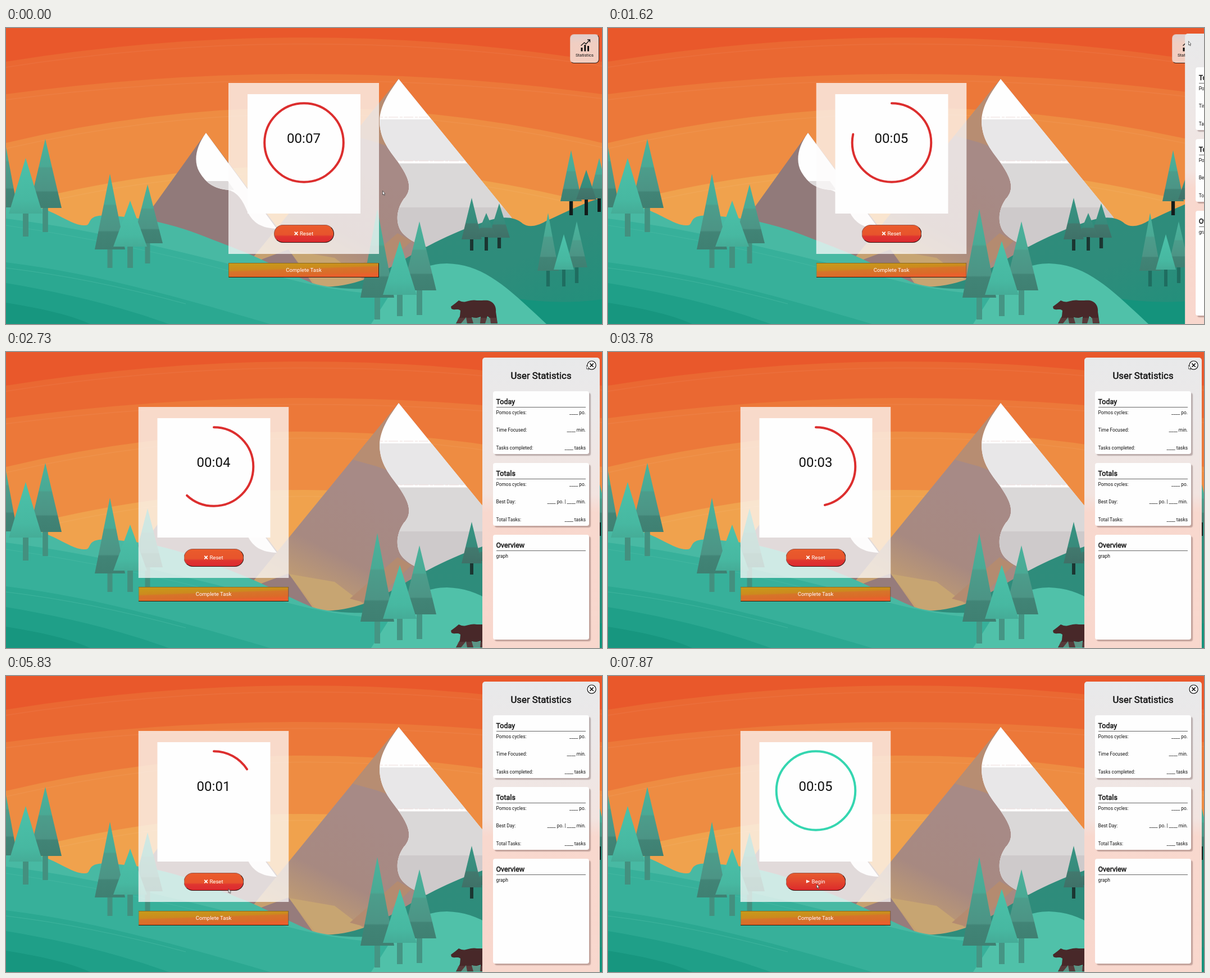
Animation, 1061 px wide and 528 px high, one loop 8000 ms. Source, as an HTML page:

```html
<!DOCTYPE html>
<html lang="en">
<head>
<meta charset="utf-8">
<title>Focus timer</title>
<style>
html, body { margin: 0; width: 100%; height: 100%; overflow: hidden; }
body { font-family: Roboto, "Open Sans", sans-serif; color: #111; }
#stage { position: relative; width: 1061px; height: 528px; overflow: hidden; background: #e9582b; }
#stage > *, .abs { position: absolute; }
#scene { left: 0; top: 0; }

.stats { left: 1004px; top: 11px; width: 50px; height: 50px; border-radius: 7px;
  background: linear-gradient(#dfcfcd, #f0cec2 30%, #f3cdbf); border: 1px solid; border-color: #e3b5a6 #33211c #33211c #e3b5a6; }
.stats svg { left: 0; top: 0; }
.stats span { left: 0; width: 100%; top: 32px; font-size: 7.7px; line-height: 10px; text-align: center; }

#timer { left: 396px; top: 98px; width: 268px; height: 348px; animation: shift 8s infinite; }
.box { left: 0; top: 0; width: 100%; height: 304.5px; background: rgba(252,251,251,.75); }
.face { left: 33.5px; top: 20px; width: 201px; height: 213px; background: #fefefe; }
.face svg { left: 0; top: 0; }
#clock { left: 0; width: 100%; top: 64px; font-size: 24px; line-height: 30px; text-align: center; }
#ring { fill: none; stroke-width: 4; stroke-linecap: round; stroke-dasharray: 1 2;
  animation: drain 8s linear infinite, tint 8s linear infinite; }
.btn { box-sizing: border-box; color: #fff; font-size: 9.6px; text-align: center; border: 1px solid; }
#action { left: 80.5px; top: 252.5px; width: 107.5px; height: 32px; border-radius: 16px; line-height: 30px;
  border-width: 1px 1.5px 1.5px 1px; border-color: #9a5548 #2a1512 #2a1512 #9a5548;
  background: linear-gradient(#ea5b2c, #e7542c 56%, #df3530 66%, #dc2a30); }
#action svg { vertical-align: -.5px; margin-right: 2.5px; }
#action.ready { background: linear-gradient(#e65a2e, #e2452d 50%, #dc2a2c); }
.task { left: 0; top: 321px; width: 268px; height: 26px; line-height: 24px;
  border-color: #8f6a20 #2d1a0c #2d1a0c #8f6a20; border-radius: 1px;
  background: linear-gradient(178deg, #c8991a 5%, #cc8a1e 38%, #d6742a 46%, #db6b29 72%, #e9602c 84%); }

#panel { left: 848px; top: 10px; width: 209px; height: 530px; border-radius: 5px 5px 0 0;
  background: linear-gradient(#e8e9ea, #ece8e8 20%, #f2e4e0 46%, #f8d8ce 52%, #f8d7cd); animation: slide 8s infinite; }
#panel h1, #panel h2 { margin: 0; font-weight: 400; -webkit-text-stroke: .45px #111; }
#panel h1 { position: absolute; left: 0; right: 0; top: 22px; font-size: 16.8px; line-height: 20px; text-align: center; }
.card { position: absolute; left: 18.5px; width: 171.5px; background: #fefefe; border-radius: 4px; box-shadow: 3px 3px 1.5px rgba(70,40,40,.3); }
.card h2 { position: absolute; left: 6px; right: 6px; top: 10px; height: 17.5px; font-size: 12.5px; line-height: 17px; border-bottom: 1px solid #666; }
.row { position: absolute; left: 6px; right: 6px; font-size: 8.4px; line-height: 10px; display: flex; justify-content: space-between; white-space: pre; }
.close { left: 186px; top: 5px; }
#cursor { left: 0; top: 0; animation: point 8s linear infinite; }

@keyframes shift { 0%, 19.1% { transform: none; animation-timing-function: ease; } 27.6%, 100% { transform: translateX(-160.5px); } }
@keyframes slide { 0%, 19.1% { transform: translateX(213px); animation-timing-function: ease; } 27.6%, 100% { transform: none; } }
@keyframes drain { 0%, 2.1% { stroke-dashoffset: 0; } 86.25% { stroke-dashoffset: 1; } 86.26%, 100% { stroke-dashoffset: 0; } }
@keyframes tint { 0%, 95% { stroke: #dc2e2e; } 98.2%, 100% { stroke: #35d6b0; } }
@keyframes point {
  0%, 1.9% { transform: translate(670px, 290px); }
  11.5%, 53% { transform: translate(1033px, 23px); }
  54.4% { transform: translate(1012px, 32px); }
  60.75% { transform: translate(804px, 72px); }
  68% { transform: translate(520px, 394px); }
  69.5% { transform: translate(470px, 404px); }
  74%, 100% { transform: translate(371px, 371px); }
}
</style>
</head>
<body>
<div id="stage">
  <svg id="scene" width="1061" height="528">
    <defs>
      <linearGradient id="pine" x2="0" y2="1">
        <stop offset="0" stop-color="#49b39d"/><stop offset=".4" stop-color="#4aa994"/>
        <stop offset=".42" stop-color="#4c9d8b"/><stop offset=".75" stop-color="#4c9485"/>
        <stop offset=".77" stop-color="#418476"/><stop offset="1" stop-color="#3f8072"/>
      </linearGradient>
      <linearGradient id="bright" x2="0" y2="1">
        <stop offset="0" stop-color="#4bc2aa"/><stop offset=".75" stop-color="#47b8a1"/><stop offset="1" stop-color="#45ac97"/>
      </linearGradient>
      <linearGradient id="dark" x2="0" y2="1">
        <stop offset="0" stop-color="#379684"/><stop offset=".6" stop-color="#388a7b"/>
        <stop offset=".63" stop-color="#42796e"/><stop offset="1" stop-color="#3f7168"/>
      </linearGradient>
      <linearGradient id="rock" gradientUnits="userSpaceOnUse" x1="690" y1="280" x2="590" y2="470">
        <stop offset="0" stop-color="#a78a86"/><stop offset=".55" stop-color="#a78981"/><stop offset="1" stop-color="#c6a06f"/>
      </linearGradient>
      <linearGradient id="ridge" x2="1" y2="1">
        <stop offset="0" stop-color="#2f8c7b"/><stop offset=".6" stop-color="#2e8c7b"/><stop offset="1" stop-color="#1f907b"/>
      </linearGradient>
      <clipPath id="cap"><path d="M699 91C682 115 666 138 665 165C665 205 690 225 705 250C722 277 720 292 708 305C692 328 694 355 708 368C720 380 735 386 748 390L900 390V338Z"/></clipPath>
      <clipPath id="meadow"><path d="M0 310C45 310 75 325 100 338S132 352 141 352C152 352 144 338 165 335C180 333 200 336 230 339C262 343 290 350 318 359C350 370 390 386 430 402C470 419 510 441 545 455C580 466 640 468 690 462L962 528H0Z"/></clipPath>
    </defs>
    <g id="sky"></g>

    <path d="M356 187L220 377L300 430L600 490L565 465Z" fill="#917a7a"/>
    <path d="M356 187C336 215 334 240 345 258C356 276 370 287 396 289C415 294 423 312 430 328C440 348 455 357 482 358Z" fill="#fefefe"/>
    <path d="M357 273H395L406 289C385 289 368 285 357 273Z" fill="#dcd8d8"/>

    <path d="M699 91L400 458L600 480L780 400L900 338Z" fill="url(#rock)"/>
    <path d="M699 91L617 192L660 204L690 215L672 130Z" fill="#b78d72"/>
    <path d="M503 396L560 468L640 452L585 410Z" fill="#c7a572"/>
    <path d="M430 422L503 395L553 466L440 470Z" fill="#967c7c"/>
    <path d="M697 366L722 380L650 450L612 440Z" fill="#b48b70"/>
    <g clip-path="url(#cap)">
      <path d="M600 80H910V400H600Z" fill="#fefefe"/>
      <path d="M600 163H910V237H600Z" fill="#e8e7e8"/>
      <path d="M600 241.500H910V320H600Z" fill="#dad8d8"/>
      <path d="M600 320H910V400H600Z" fill="#cecacb"/>
      <path d="M600 159H910M600 237H910" stroke="#eddcda" stroke-dasharray="17 3 5 2"/>
    </g>

    <path d="M1061 303C1035 309 1000 327 960 345C945 354 930 356 920 349C905 336 885 336 860 343C800 362 750 388 705 415C660 442 620 462 560 462L700 528H1061Z" fill="url(#ridge)"/>
    <path d="M905 482C960 490 1010 491 1061 484V528H950Z" fill="#14937c"/>

    <g clip-path="url(#meadow)">
      <path d="M0 300H1061V528H0Z" fill="#48b9a3"/>
      <path d="M0 340C180 362 360 412 520 452S800 474 1061 480V528H0Z" fill="#37b09a"/>
      <path d="M0 418C150 436 300 478 470 528H0Z" fill="#2ba891"/>
      <path d="M0 455C90 470 190 492 290 528H0Z" fill="#1f9f88"/>
      <path d="M0 490C60 500 110 510 150 528H0Z" fill="#17967f"/>
      <path d="M0 352Q220 385 400 434M0 428Q150 446 320 492" fill="none" stroke="#4cbba6" stroke-opacity=".6"/>
    </g>
    <path d="M690 465C720 432 755 420 785 420C850 422 890 460 962 528H650Z" fill="#50c1a9"/>
    <g id="trees"></g>
    <path d="M792 497L800 491L806 486L811 488C819 490 824 485 834 485.500C844 487 850 485 858 486C868 488 873 497 872 506L875 527H863L862 518L857 514L853 527H844L845 515C838 518 834 517 829 516L832 527H821L819 516L810 527H801L808 514L809 504C804 500 799 504 793 501Z" fill="#482829"/>
    <path d="M805 517H873L875 527H802Z" fill="#6b5450" opacity=".4"/>
  </svg>

  <div class="stats">
    <svg class="abs" width="50" height="50" fill="none" stroke="#111">
      <path d="M20 23V29.500M25.800 18V29.500M31.500 20V29.500" stroke-width="3"/>
      <path d="M18.500 19.500L24.500 14L27.500 16.500L34 9.500M30 9H34.500V13.500" stroke-width="1.300"/>
    </svg>
    <span class="abs">Statistics</span>
  </div>

  <div id="timer">
    <div class="abs box"></div>
    <div class="abs face">
      <svg class="abs" width="201" height="213">
        <circle id="ring" cx="100.500" cy="86.500" r="70.300" pathLength="1" transform="rotate(-90 100.500 86.500)"/>
      </svg>
      <div id="clock" class="abs">00:07</div>
    </div>
    <div id="action" class="abs btn"><svg width="7" height="7"><path id="icon" stroke="#fff"/></svg><span id="label">Reset</span></div>
    <div class="abs btn task">Complete Task</div>
  </div>

  <div id="panel">
    <h1>User Statistics</h1>
    <svg class="abs close" width="18" height="18" stroke="#111">
      <circle cx="8.600" cy="8.600" r="7.600" fill="#fff" stroke-width="1.200"/>
      <path d="M5.400 5.400L11.800 11.800M11.800 5.400L5.400 11.800" stroke-width="1.600"/>
    </svg>
  </div>

  <svg id="cursor" width="8" height="12"><path d="M.5 .5V7.500L2 6.200L3.200 8.800L4.300 8.300L3.200 5.800H5Z" fill="#fff" stroke="#333" stroke-width=".7"/></svg>
</div>
<script>
const $ = id => document.getElementById(id);

// Sky bands: height at the sides, height in the middle, colour
$('sky').innerHTML = [
  [60, 17, '#ea6832'], [118, 82, '#ec7839'], [205, 142, '#ee8c42'], [318, 246, '#f0a24d']
].map(([side, mid, color]) =>
  `<path d="M0 ${side}Q530 ${2 * mid - side} 1061 ${side}V528H0Z" fill="${color}"/>
   <path d="M0 ${side + 10}Q530 ${2 * mid - side + 14} 1061 ${side + 8}" fill="none" stroke="#fff" stroke-opacity=".04" stroke-width="2"/>`
).join('');

function tree(x, top, base, half, foot, fill, trunk) {
  const w = half / 3;
  return `<path d="M${x - w / 2} ${base - 3}h${w}V${foot}h${-w}Z" fill="${trunk}"/>
    <path d="M${x} ${top}L${x + half} ${base}H${x - half}Z" fill="url(#${fill})"/>`;
}
const groups = [
  ['#43907f', [-6, 180, 320, 26, 345], [70, 198, 321, 29, 364], [35, 232, 331, 30, 372]],
  ['#43907f', [185, 260, 395, 27, 428], [252, 279, 384, 27, 420], [221, 308, 390, 30, 428]],
  ['#459584', [661, 323, 481, 30, 520], [736, 345, 468, 30, 512], [701, 380, 476, 30, 514]],
  ['#1b3632', [829, 303, 377, 18, 397], [878, 313, 374, 19, 393], [855, 330, 373, 18, 397]],
  ['#121c1b', [1006, 218, 309, 19, 334], [1056, 232, 304, 18, 328], [1033, 253, 306, 18, 334]],
  ['#1f6d60', [965, 330, 433, 19, 461], [1016, 345, 427, 19, 455], [993, 368, 431, 18, 461]]
];
$('trees').innerHTML = groups.map(([trunk, ...list], g) => list.map((spec, i) => {
  const fill = g === 3 || (g === 4 && i === 2) ? 'dark' : i === 2 ? 'bright' : 'pine';
  return tree(...spec, fill, trunk);
}).join('')).join('');

const cards = [
  ['Today', 60, 112, ['Pomos cycles:', '____ po.'], ['Time Focused:', '____ min.'], ['Tasks completed:', '____ tasks']],
  ['Totals', 188, 112, ['Pomos cycles:', '____ po.'], ['Best Day:', '____ po. | ____ min.'], ['Total Tasks:', '____ tasks']],
  ['Overview', 316, 187, ['graph', '']]
];
$('panel').insertAdjacentHTML('beforeend', cards.map(([title, top, height, ...rows]) =>
  `<div class="card" style="top:${top}px;height:${height}px"><h2>${title}</h2>` +
  rows.map(([name, value], i) =>
    `<div class="row" style="top:${32.5 + i * 31.7}px"><span>${name}</span><span>${value}</span></div>`).join('') +
  '</div>').join(''));

const LOOP = 8000, BEGIN = 170, END = 6900, WORK = 7, REST = 5;
let start;
function tick(now) {
  start ??= now;
  const t = (now - start) % LOOP;
  const done = t >= END;
  const left = WORK * Math.min(1, (END - t) / (END - BEGIN));
  $('clock').textContent = '00:0' + (done ? REST : Math.floor(left));
  $('label').textContent = done ? 'Begin' : 'Reset';
  $('action').className = 'abs btn' + (done ? ' ready' : '');
  $('icon').setAttribute('d', done ? 'M.5 .8L6.500 3.500L.5 6.200Z' : 'M.7 .7L6.300 6.300M6.300 .7L.7 6.300');
  $('icon').setAttribute('fill', done ? '#fff' : 'none');
  $('icon').setAttribute('stroke-width', done ? .5 : 1.7);
  requestAnimationFrame(tick);
}
requestAnimationFrame(tick);
</script>
</body>
</html>
```
